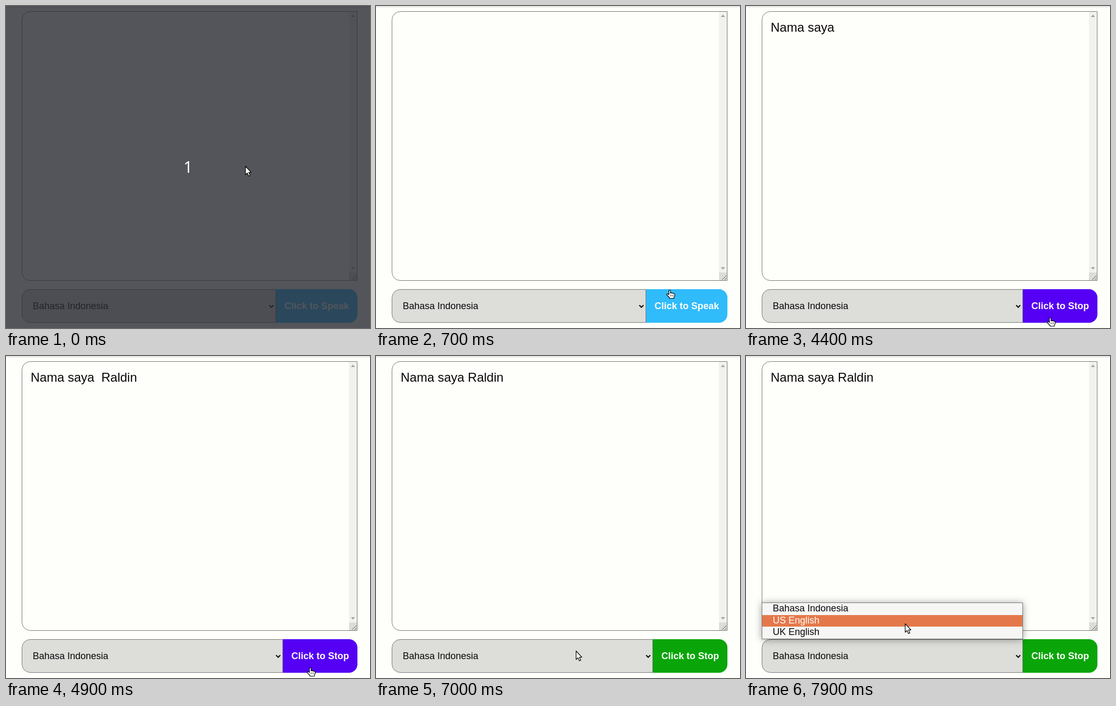
These frames come from a looping animation (694x614 px, 8000 ms). An HTML page:

```html
<!DOCTYPE html>
<html lang="en">
<head>
<meta charset="utf-8">
<title>Speech to text</title>
<style>
  html, body { margin: 0; width: 100%; height: 100%; overflow: hidden; background: #fefffb; }
  svg { display: block; width: 694px; height: 614px; }
  text { font: 18px "Liberation Sans", Arial, sans-serif; fill: #0a0508; white-space: pre; }
  #speech { font-size: 24px; }
  #label { font-weight: bold; fill: #fefffb; }
  #count { font: 30px "Noto Sans", "Open Sans", sans-serif; fill: #fff; }
  .edge { stroke: #767676; }
  #cursor path { fill: #fff; stroke: #000; stroke-width: 1.2; stroke-linejoin: round; }
  #menu { filter: drop-shadow(0 1px 7px rgba(0, 0, 0, .38)); }
</style>
</head>
<body>
<svg viewBox="0 0 694 614">
  <rect width="694" height="614" fill="#fefffb"/>
  <rect y="1" width="694" height="1" fill="#c8cac6"/>

  <!-- text area -->
  <path class="edge" fill="#fefffb" d="M669.5 10.5H46.5a16 16 0 0 0-16 16V507.5a16 16 0 0 0 16 16H669.5Z"/>
  <rect x="654" y="11" width="15" height="497" fill="#f1f2ee"/>
  <rect x="654" y="508" width="15" height="15" fill="#dcddd9"/>
  <path d="M657.5 21l4-4.5 4 4.5zM657.5 498l4 4.5 4-4.5z" fill="#a3a4a1"/>
  <path d="M660 522l8-8M665 522l3-3" stroke="#555" fill="none"/>
  <text id="speech" x="47" y="49"></text>

  <!-- language select and button -->
  <path id="select" class="edge" fill="#dddeda"/>
  <text x="51" y="578">Bahasa Indonesia</text>
  <path id="chevron" d="M-4 -2L0 2L4 -2" fill="none" stroke="#000" stroke-width="2"/>
  <path id="button"/>
  <text id="label" x="654" y="578" text-anchor="end"></text>

  <g id="menu">
    <rect class="edge" x="30.5" y="470.5" width="497" height="69" fill="#f6f7f4"/>
    <rect id="mark" x="31" width="496" fill="#e5784a"/>
    <text class="item" x="51" y="487">Bahasa Indonesia</text>
    <text class="item" x="51" y="510">US English</text>
    <text class="item" x="51" y="532">UK English</text>
  </g>

  <g id="shade">
    <rect width="694" height="614" fill="rgb(41,43,52)" fill-opacity=".8"/>
    <text id="count" x="347" y="318" text-anchor="middle">1</text>
  </g>

  <g id="cursor">
    <path id="arrow" d="M.5 .5V16.8L4.1 13.4L6.7 19.3L9.4 18.1L6.8 12.3H11.5Z"/>
    <path id="beam" d="M-3.5 -7.5H3.5V-5.5H1.2V5.5H3.5V7.5H-3.5V5.5H-1.2V-5.5H-3.5Z"/>
    <g id="hand">
      <path d="M1.5 1.5Q3 -.5 4.5 1.5V6.5L6 5.8L7.5 6.8L9 6.2L10.5 7.4Q12.5 7 12.5 9V12L11 14V16.5H2.5V15L-2.5 10Q-3 7.5 -.5 8L1.5 9.5Z"/>
      <path d="M4.5 9.5v3M7 9.5v3M9.5 9.5v3" style="stroke-width:.8"/>
    </g>
  </g>
</svg>
<script>
const LOOP = 8000, STEP = 100;
const $ = id => document.getElementById(id);
const set = (id, name, value) => $(id).setAttribute(name, value);
const show = (id, on) => set(id, "visibility", on ? "visible" : "hidden");
const clamp = v => Math.max(0, Math.min(1, v));

const BLUE = [48, 187, 251], PURPLE = [85, 0, 245], GREEN = [9, 165, 9];
const SPEECH = [
  [0, ""],
  [4400, "Nama saya"],
  [4700, "Nama\u00a0\u00a0saya"],
  [4900, "Nama saya\u00a0\u00a0Raldin"],
  [6600, "Nama saya Raldin"]
];
// time, x, y
const PATH = [
  [0, 456, 305], [100, 470, 329], [500, 526, 462], [800, 573, 580], [900, 577, 594],
  [6600, 577, 594], [6800, 485, 582], [7000, 381, 562],
  [7500, 381, 562], [7600, 370, 553], [7700, 345, 535], [7900, 303, 510], [8000, 303, 510]
];
const ROWS = [[471, 23], [494, 22], [516, 23]];

function cursorAt(t) {
  const i = Math.max(1, PATH.findIndex(p => p[0] >= t));
  const [t0, x0, y0] = PATH[i - 1], [t1, x1, y1] = PATH[i];
  const k = (t - t0) / (t1 - t0);
  return [x0 + (x1 - x0) * k, y0 + (y1 - y0) * k].map(Math.round);
}

function fade(a, b, k) {
  return `rgb(${a.map((v, i) => Math.round(v + (b[i] - v) * k))})`;
}

function cursorShape(t, y) {
  if (t < 100 || t >= 6600) return "arrow";
  if (y < 524) return "beam";
  return y < 540 ? "arrow" : "hand";
}

function draw(t) {
  const stop = t >= 1200, left = stop ? 528 : 515;
  const [x, y] = cursorAt(t);

  show("shade", t < 100);
  $("speech").textContent = SPEECH.filter(s => s[0] <= t).pop()[1];

  set("select", "d", `M${left - .5} 540.5H46.5a16 16 0 0 0-16 16V587.5a16 16 0 0 0 16 16H${left - .5}Z`);
  set("chevron", "transform", `translate(${left - 9} 572.5)`);
  set("button", "d", `M${left} 540H654a16 16 0 0 1 16 16V588a16 16 0 0 1-16 16H${left}Z`);
  set("button", "fill", t < 6600
    ? fade(BLUE, PURPLE, clamp((t - 700) / 300))
    : fade(PURPLE, GREEN, clamp((t - 6700) / 250)));
  $("label").textContent = stop ? "Click to Stop" : "Click to Speak";

  const open = t >= 7100;
  const row = y > 539 ? 0 : y >= 516 ? 2 : 1;
  set("menu", "display", open ? "inline" : "none");
  set("mark", "y", ROWS[row][0]);
  set("mark", "height", ROWS[row][1]);
  document.querySelectorAll(".item").forEach((item, i) => {
    item.style.fill = i === row ? "#fefffb" : "#0a0508";
  });

  const shape = cursorShape(t, y);
  for (const id of ["arrow", "beam", "hand"]) show(id, id === shape);
  set("cursor", "transform", `translate(${x} ${y})`);
}

const start = performance.now();
function tick() {
  const t = (performance.now() - start) % LOOP;
  draw(Math.floor(t / STEP) * STEP);
  requestAnimationFrame(tick);
}
tick();
</script>
</body>
</html>
```
